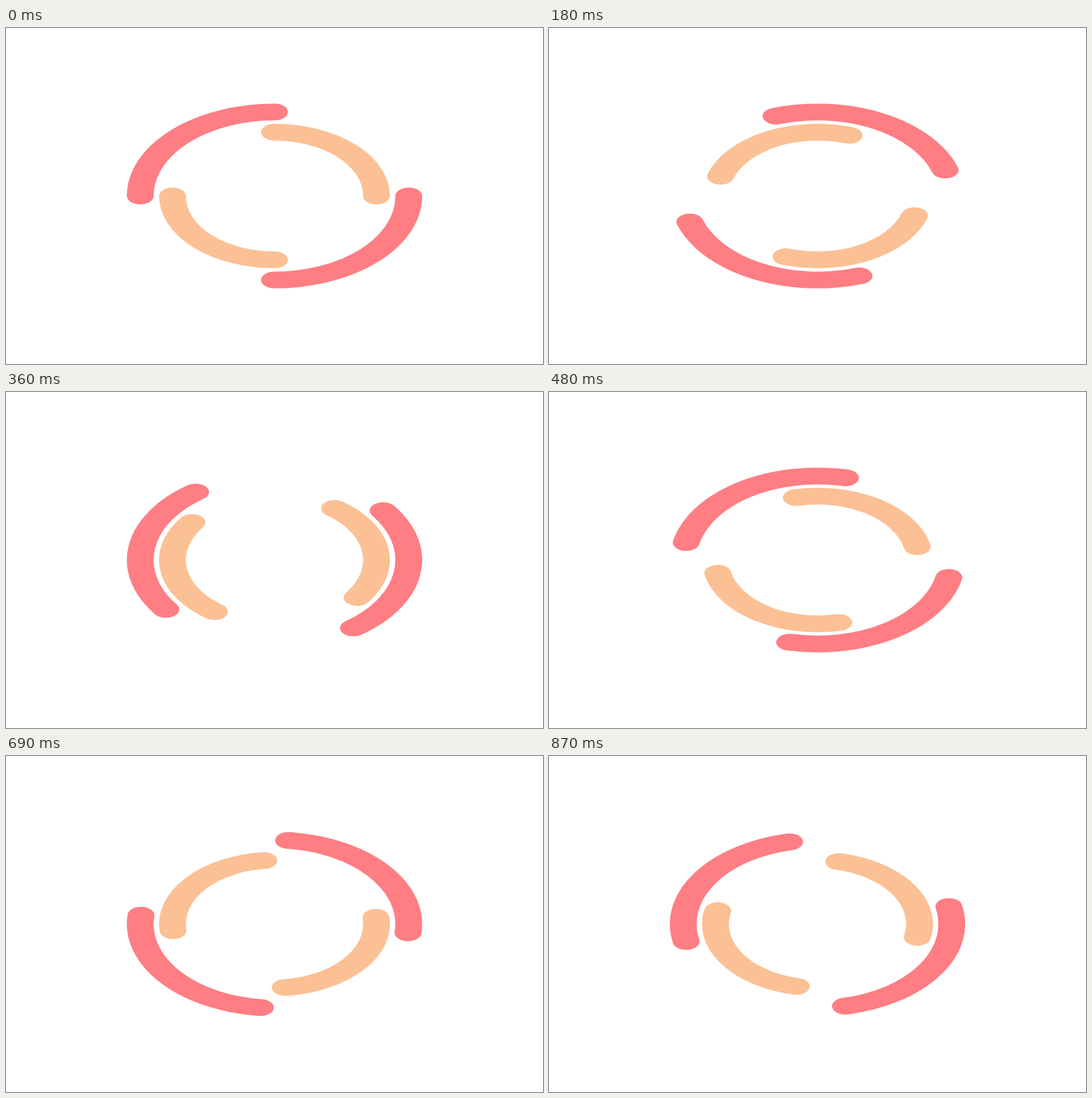
An HTML page that plays this animation: 947 by 592 pixels, repeating every 900 ms.

```html
<!DOCTYPE html>
<html lang="en">
<head>
<meta charset="utf-8">
<title>Double ring spinner</title>
<style>
  html, body { margin: 0; width: 100%; height: 100%; overflow: hidden; background: #fff; }
  svg { display: block; width: 100%; height: 100%; }
  path { fill: none; stroke-width: 5; stroke-linecap: round; }
</style>
</head>
<body>
<!-- The square viewBox is stretched, so circles turn into ellipses. -->
<svg viewBox="-50 -50 100 100" preserveAspectRatio="none">
  <path id="outer" stroke="#fe7e84" d="M25 0A25 25 0 0 1 0 25M-25 0A25 25 0 0 1 0 -25"/>
  <path id="inner" stroke="#fcc095" d="M0 -19A19 19 0 0 1 19 0M0 19A19 19 0 0 1 -19 0"/>
</svg>
<script>
  const STEP = 30, STEPS = 30; // ms per step, steps per turn
  const outer = document.getElementById('outer');
  const inner = document.getElementById('inner');

  function draw() {
    const angle = Math.floor(performance.now() / STEP) % STEPS * 360 / STEPS;
    outer.setAttribute('transform', `rotate(${angle})`);
    inner.setAttribute('transform', `rotate(${-angle})`);
    requestAnimationFrame(draw);
  }
  draw();
</script>
</body>
</html>
```
